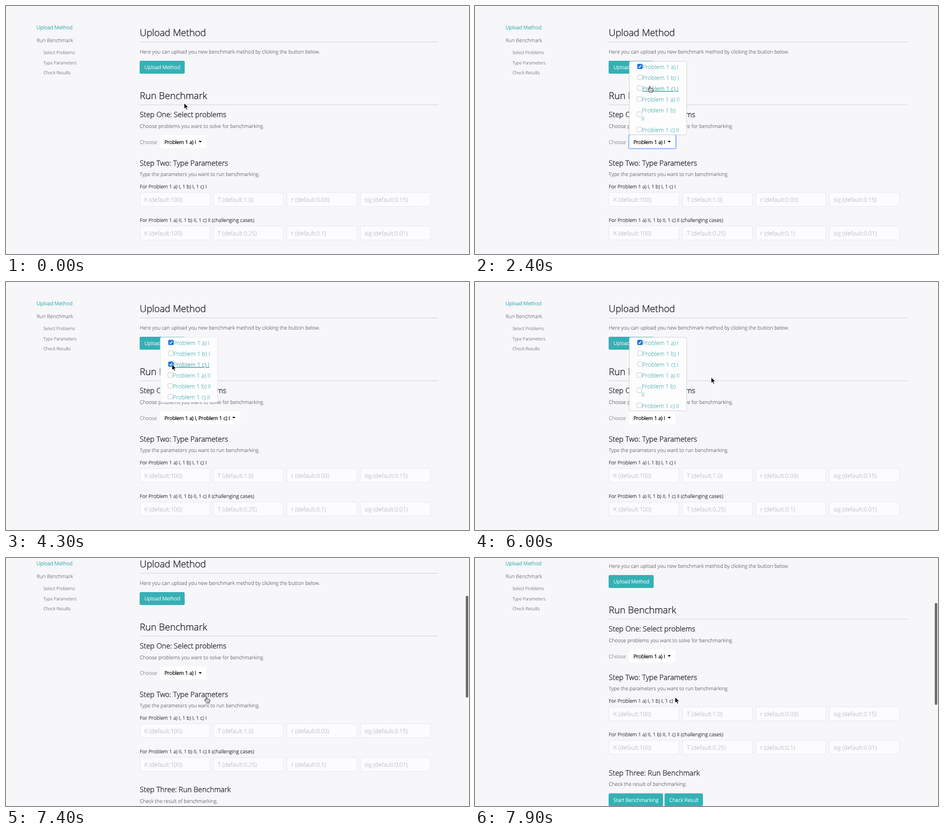
Write an HTML page that moves like this. It is 894 by 480 pixels and loops after 8000 ms.

```html
<!DOCTYPE html>
<html lang="en">
<head>
<meta charset="utf-8">
<title>Benchmark page</title>
<style>
  html, body { margin: 0; width: 100%; height: 100%; overflow: hidden; background: #f7f6f9; }
  svg { display: block; width: 894px; height: 480px; }
  text {
    font-family: "Open Sans", "Noto Sans", sans-serif;
    font-weight: 300;
    text-rendering: geometricPrecision;
    white-space: pre;
    stroke: currentColor;
    stroke-width: .1px;
    fill: currentColor;
  }
  .h2 { font-size: 18.2px; color: #24282d; stroke-width: .42px; }
  .h4 { font-size: 14.05px; color: #24282d; stroke-width: .35px; }
  .p { font-size: 9.83px; color: #4e5257; }
  .muted { font-size: 9.83px; color: #6c757d; }
  .label { font-size: 9.8px; color: #212529; stroke-width: .2px; }
  .pick { font-size: 9.87px; color: #000; stroke-width: .4px; }
  .btn { font-size: 9.87px; color: #fff; stroke-width: .25px; }
  .hint { font-size: 11.32px; color: #b0b4b9; }
  .nav { font-size: 9.87px; color: #5f6368; }
  .on { color: #2fadb2; stroke-width: .25px; }
  .sub { font-size: 8.45px; color: #5f6368; }
  .item { font-size: 11.3px; color: #3fa9ad; }
  .hover { text-decoration: underline; color: #2a9297; }
</style>
</head>
<body>
<svg id="stage" viewBox="0 0 894 480"></svg>
<script>
const LOOP = 8000, STEP = 100;
const OPEN = 1100, BLUR = 3800, CHECK = 3900, UNCHECK = 5100, CLOSE = 6200, SCROLL = 7200;
const LEFT = 258.3, ROW = 21, MENU_X = 298, MENU_Y = 107, MENU_W = 110.8, WRAP = 16.8;
const stage = document.getElementById("stage");

function add(parent, tag, attrs = {}, content) {
  const el = document.createElementNS("http://www.w3.org/2000/svg", tag);
  for (const key in attrs) el.setAttribute(key, attrs[key]);
  if (content !== undefined) el.textContent = content;
  parent.appendChild(el);
  return el;
}
const label = (parent, cls, x, y, content) => add(parent, "text", { class: cls, x, y }, content);
const rect = (parent, x, y, width, height, fill, more) =>
  add(parent, "rect", { x, y, width, height, fill, ...more });
const show = (el, on) => el.setAttribute("visibility", on ? "inherit" : "hidden");
const move = (el, x, y) => el.setAttribute("transform", `translate(${x} ${y})`);
const within = (v, from, to) => v >= from && v < to;

// Side navigation
const side = add(stage, "g");
label(side, "nav on", 59, 45, "Upload Method");
label(side, "nav", 59, 70, "Run Benchmark");
["Select Problems", "Type Parameters", "Check Results"].forEach((name, i) =>
  label(side, "sub", 72.5, 93 + i * 19.6, name));

// Main column
const page = add(stage, "g");

function section(title, y) {
  label(page, "h2", LEFT, y, title);
  rect(page, LEFT, y + 11, 576, 1, "#d3d3d7");
}
function step(title, note, y) {
  label(page, "h4", LEFT, y, title);
  label(page, "p", LEFT, y + 20.5, note);
}
function button(name, x, y, width) {
  rect(page, x, y, width, 25, "#36b0b5", { rx: 2.5 });
  label(page, "btn", x + 9.2, y + 16, name);
}
function inputs(title, hints, y) {
  label(page, "label", LEFT, y, title);
  hints.forEach((hint, i) => {
    const x = 258.7 + i * 141.8;
    rect(page, x, y + 7.8, 135.4, 27, "#fcfbfd", { rx: 2, stroke: "#e5e5ea", "stroke-width": .8 });
    label(page, "hint", x + 8.5, y + 25.7, hint);
  });
}

section("Upload Method", 58);
label(page, "p", LEFT, 91.8, "Here you can upload you new benchmark method by clicking the button below.");
button("Upload Method", 258, 106, 87);
section("Run Benchmark", 179.6);
step("Step One: Select problems", "Choose problems you want to solve for benchmarking.", 215.1);
label(page, "muted", LEFT, 266.5, "Choose");
step("Step Two: Type Parameters", "Type the parameters you want to run benchmarking.", 308.6);
inputs("For Problem 1 a) I, 1 b) I, 1 c) I",
  ["K (default:100)", "T (default:1.0)", "r (default:0.03)", "sig (default:0.15)"], 353.1);
inputs("For Problem 1 a) II, 1 b) II, 1 c) II (challenging cases)",
  ["K (default:100)", "T (default:0.25)", "r (default:0.1)", "sig (default:0.01)"], 418.1);
step("Step Three: Run Benchmark", "Check the result of benchmarking.", 493.5);
button("Start Benchmarking", 258, 528.6, 105);
button("Check Result", 366, 528.6, 74);

// Problem picker
const ring = rect(page, 297, 249.3, 91, 26.6, "none",
  { rx: 3, stroke: "#86b4f7", "stroke-width": 2 });
const pickBox = rect(page, 297.8, 250, 89.2, 25.3, "#fff", { rx: 2 });
const pickText = label(page, "pick", 306, 266.5, "");
const caret = add(page, "path", { d: "M-3 -1.5H3L0 1.7Z", fill: "#000" });

// Dropdown list
const menu = add(page, "g");
const menuBox = rect(menu, MENU_X, MENU_Y, MENU_W, 0, "#fdfdfe", { rx: 2.5, "stroke-width": .9 });

function checkbox() {
  const box = add(menu, "g");
  rect(box, -4.6, -4.6, 9.2, 9.2, "#fff", { rx: 1.8, stroke: "#b9bbc1", "stroke-width": .8 });
  const tick = add(box, "g");
  rect(tick, -5, -5, 10, 10, "#1c72ea", { rx: 1.8 });
  add(tick, "path", { d: "M-2.5 .2L-.7 2.3L2.5 -2.6", fill: "none", stroke: "#fff", "stroke-width": 1.4 });
  return { box, tick };
}
const items = ["a) I", "b) I", "c) I", "a) II", "b) II", "c) II"].map((name, i) => {
  const x = i > 2 ? 322 : 323.2, y = MENU_Y + 14.8 + i * ROW;
  return { x, y, text: label(menu, "item", x, y, "Problem 1 " + name), ...checkbox() };
});
const tail = label(menu, "item", 321.6, 222.4, "II");

function layMenu(wrapped) {
  const drop = wrapped ? WRAP : 0;
  menuBox.setAttribute("height", 125.5 + drop);
  menuBox.setAttribute("stroke", wrapped ? "#cfcfd4" : "#e6e6ea");
  items[4].text.textContent = wrapped ? "Problem 1 b)" : "Problem 1 b) II";
  items.forEach(({ x, y, text, box }, i) => {
    text.setAttribute("y", y + (i > 4 ? drop : 0));
    move(box, x - 4.8, y - 4.8 + (i > 4 ? drop : i > 3 ? drop / 2 : 0));
  });
  show(tail, wrapped);
}

// Scroll thumb and pointer
const thumb = rect(stage, 887.8, 0, 4.8, 197.5, "#6a6a6c", { rx: 2.4 });
const pointer = add(stage, "g");
const arrow = add(pointer, "path", {
  d: "M0 0V11L2.6 8.7L4.4 12.7L6.3 11.9L4.6 8H8Z",
  fill: "#000", stroke: "#fff", "stroke-width": .8, "stroke-linejoin": "round"
});
const hand = add(pointer, "g", { transform: "translate(0 -.8)" });
add(hand, "path", {
  d: "M0 1Q.9 -.5 1.8 1V4.8Q2.8 3.8 3.8 5Q4.8 4.1 5.7 5.4Q7.2 4.9 7.3 6.5V8.5L6.2 10.4V12H.6V10.6L-2.7 7.1Q-3 5.5 -1.4 5.8L0 7Z",
  fill: "#fff", stroke: "#111", "stroke-width": .9, "stroke-linejoin": "round"
});
add(hand, "path", { d: "M2 7.3V10M3.7 7.3V10M5.4 7.3V10", stroke: "#111", "stroke-width": .6 });

// Pointer gestures, each eased from where the last one ended
const gestures = [
  { from: 0, to: 800, x: 369, y: 259 },
  { from: 1100, to: 1600, x: 348, y: 158.6 },
  { from: 1600, to: 1900, x: 344, y: 133 },
  { from: 1900, to: 2800, x: 331, y: 172 },
  { from: 2800, to: 3300, x: 320.5, y: 156 },
  { from: 3300, to: 3700, x: 320.5, y: 159.5 },
  { from: 5500, to: 5800, x: 474, y: 192 },
  { from: 5800, to: 6000, x: 456, y: 184.5 },
  { from: 6500, to: 7000, x: 386.3, y: 269.5 }
];
const clamp = u => Math.min(1, Math.max(0, u));
const smooth = u => u * u * (3 - 2 * u);

function pointerAt(t) {
  return gestures.reduce((p, g) => {
    const k = smooth(clamp((t - g.from) / (g.to - g.from)));
    return { x: p.x + (g.x - p.x) * k, y: p.y + (g.y - p.y) * k };
  }, { x: 344, y: 188 });
}

// Row of the open list under a point, or -1
function rowAt({ x, y }, wrapped) {
  if (!within(x, MENU_X, MENU_X + MENU_W)) return -1;
  const row = Math.floor((y - MENU_Y) / ROW);
  const lower = Math.floor((y - MENU_Y - (wrapped ? WRAP : 0)) / ROW);
  const hit = row > 4 ? Math.max(4, lower) : row;
  return hit < items.length ? hit : -1;
}

function draw(t) {
  const scroll = 73 * (1 - (1 - clamp((t - SCROLL) / 700)) ** 2.36);
  move(page, 0, -scroll);
  move(side, 0, -Math.min(scroll, 31));
  thumb.setAttribute("y", 56 + scroll * .424);
  show(thumb, t > SCROLL);

  const two = within(t, CHECK, UNCHECK), open = within(t, OPEN, CLOSE);
  pickText.textContent = two ? "Problem 1 a) I, Problem 1 c) I" : "Problem 1 a) I";
  pickBox.setAttribute("width", two ? 154 : 89.2);
  move(caret, two ? 439.8 : 375, 262.5);
  show(ring, within(t, OPEN, BLUR));
  show(menu, open);
  layMenu(!two);
  show(tail, open && !two);

  // Hover feedback trails the pointer by one step
  const seen = pointerAt(t - STEP), now = pointerAt(t);
  const row = open ? rowAt(seen, !two) : -1;
  items.forEach((item, i) => {
    item.text.classList.toggle("hover", i === row);
    show(item.tick, i === 0 || (i === 2 && two));
  });
  tail.classList.toggle("hover", row === 4);

  const onPick = within(seen.x, 298, 387) && within(seen.y, 250, 275) && t < SCROLL + 300;
  const linked = onPick || (row >= 0 && seen.x > items[0].x);
  move(pointer, now.x, now.y);
  show(hand, linked);
  show(arrow, !linked);
}

const start = performance.now();
function tick() {
  const t = (performance.now() - start) % LOOP;
  draw(Math.floor(t / STEP) * STEP);
  requestAnimationFrame(tick);
}
draw(0);
requestAnimationFrame(tick);
</script>
</body>
</html>
```
